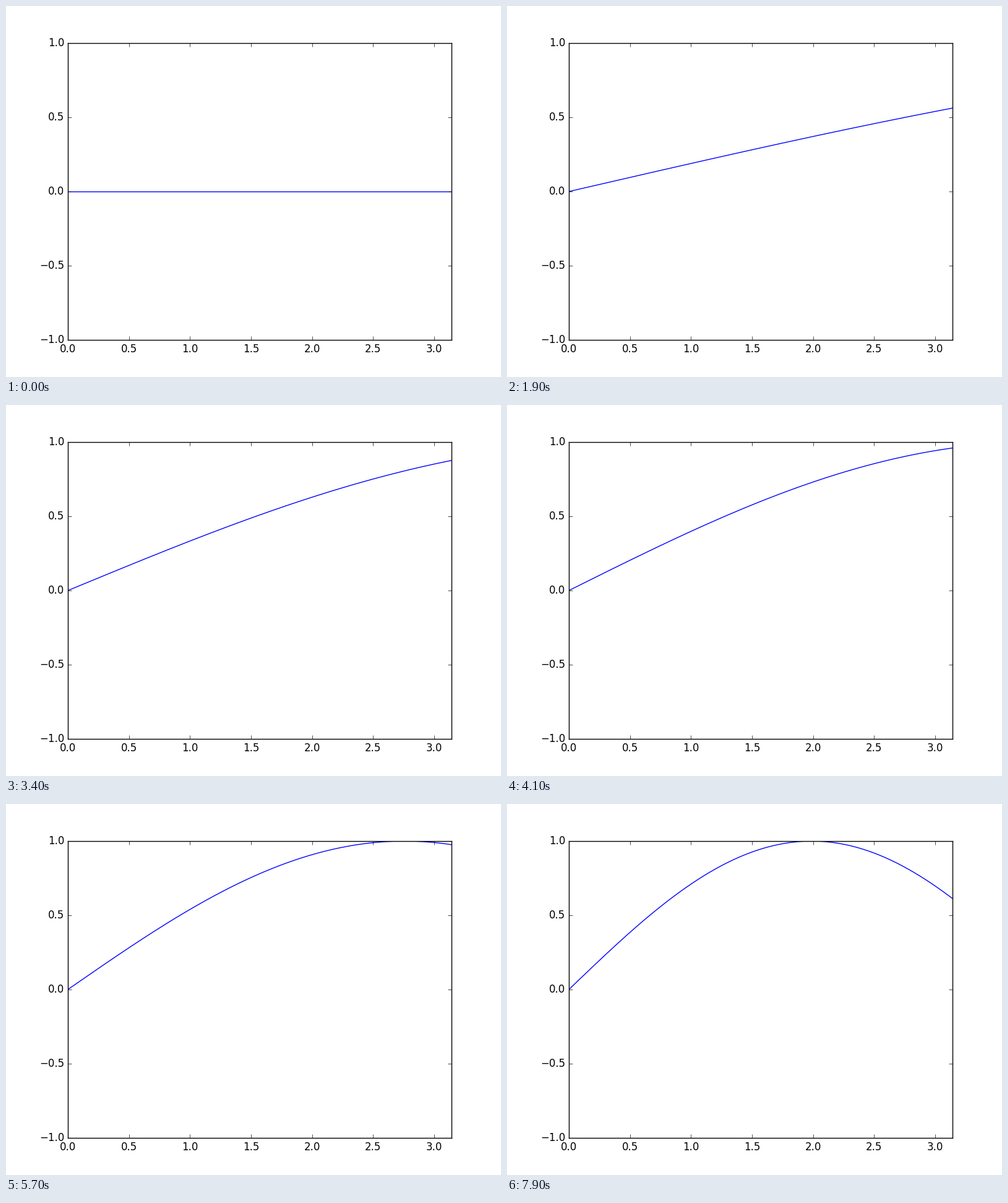
These frames come from a looping animation (800 px wide and 600 px high, 8 s). A matplotlib script:

```python
import numpy as np
import matplotlib.pyplot as plt
from matplotlib.animation import FuncAnimation

FRAMES = 80
INTERVAL = 100  # ms
FREQ_STEP = 0.01

plt.style.use("classic")
plt.rcParams.update({"font.family": "DejaVu Sans", "figure.dpi": 100, "savefig.dpi": 100})

fig = plt.figure(figsize=(8, 6), dpi=100, facecolor="white")
ax = fig.add_axes([0.125, 0.1, 0.775, 0.8])
ax.set_xlim(0, np.pi)
ax.set_ylim(-1, 1)
ax.set_xticks(np.arange(0, 3.1, 0.5))
ax.set_yticks(np.arange(-1, 1.1, 0.5))

x = np.linspace(0, np.pi, 200)
line, = ax.plot(x, np.zeros_like(x), color="#0000ff", lw=1)


def update(i):
    """Raise the frequency of the sine steadily from zero."""
    line.set_ydata(np.sin(FREQ_STEP * i * x))
    return line,


anim = FuncAnimation(fig, update, frames=FRAMES, interval=INTERVAL,
                     repeat=True, repeat_delay=0, blit=False)
plt.show()
```
